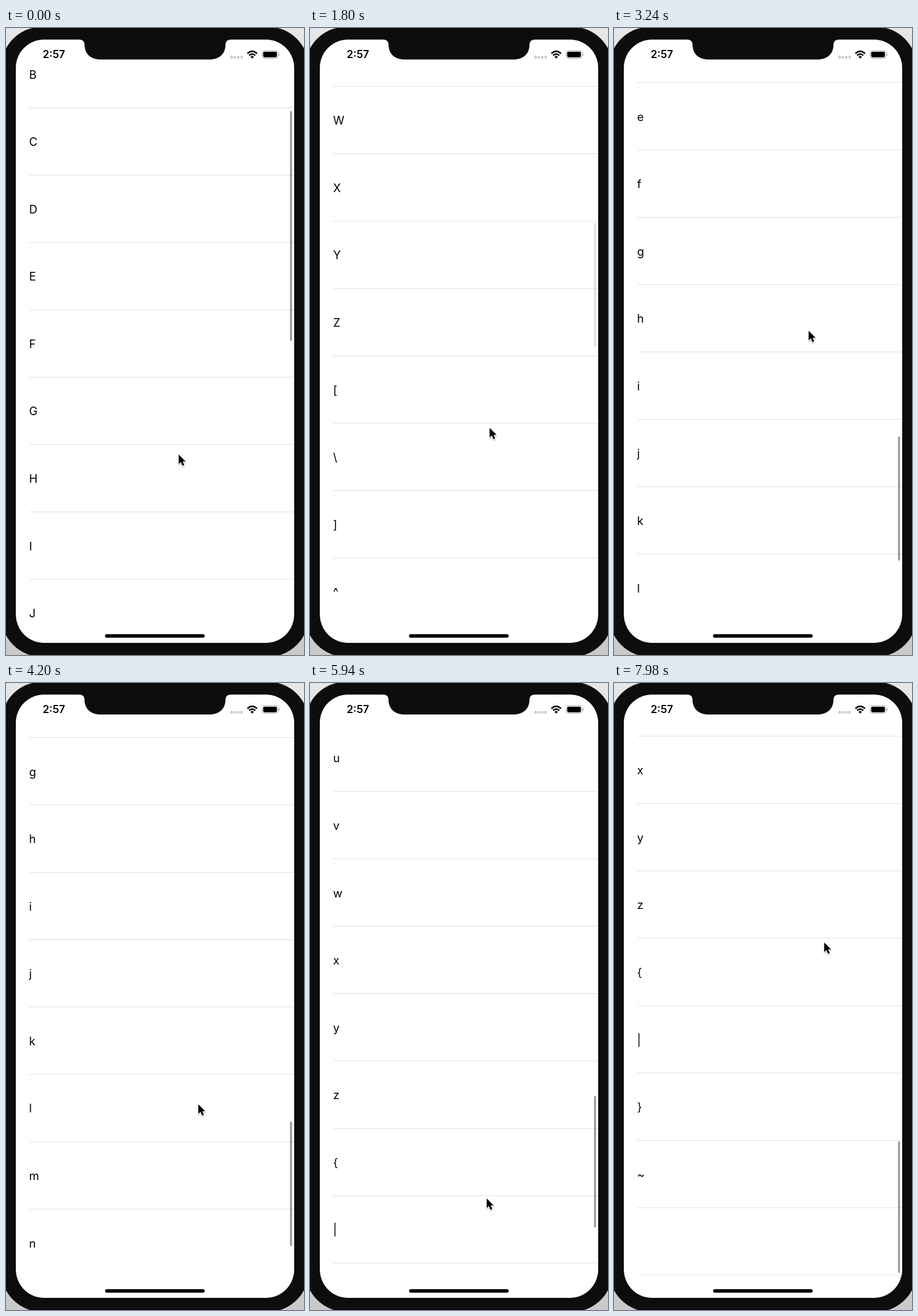
An HTML page that plays this animation: 516x1085 px, repeating every 8 s.

```html
<!DOCTYPE html>
<html lang="en">
<head>
<meta charset="utf-8">
<title>Endless list</title>
<style>
  html, body { margin: 0; width: 100%; height: 100%; overflow: hidden; background: #dcdcde; }
  svg { display: block; width: 100%; height: 100%; font-family: Inter, "Liberation Sans", sans-serif; }
</style>
</head>
<body>
<svg viewBox="0 0 516 1085">
  <defs>
    <linearGradient id="desk" x2="0" y2="1">
      <stop stop-color="#e6e6e8"/><stop offset="1" stop-color="#c9c9ca"/>
    </linearGradient>
    <clipPath id="view"><rect x="17" y="71.2" width="482" height="953.6"/></clipPath>
    <filter id="soft" x="-50%" y="-50%" width="200%" height="200%">
      <feDropShadow dx="0" dy="1.5" stdDeviation="1.2" flood-opacity=".35"/>
    </filter>
  </defs>

  <rect width="516" height="1085" fill="url(#desk)"/>
  <rect x="-8" y="-2" width="532" height="1090" rx="70" fill="#0d0d0d"/>
  <rect x="17" y="20" width="482" height="1044" rx="49" fill="#fff"/>

  <g clip-path="url(#view)"><g id="rows" font-size="19.8"></g></g>
  <rect id="thumb" x="491.7" width="3.6" rx="1.8" fill-opacity=".39"/>

  <path d="M126 19.5H390V20Q380 20 380 29C380 45 369 54.5 352 54.5H164C147 54.5 136 45 136 29Q136 20 126 20Z" fill="#0d0d0d"/>
  <text x="63.5" y="52.3" font-size="18.2" font-weight="600">2:57</text>
  <g fill="#c9c9c9">
    <rect x="388.4" y="48.6" width="4.4" height="4.2" rx="1"/>
    <rect x="394.2" y="48.6" width="4.4" height="4.2" rx="1"/>
    <rect x="400" y="48.6" width="4.4" height="4.2" rx="1"/>
    <rect x="405.8" y="48.6" width="4.4" height="4.2" rx="1"/>
  </g>
  <g fill="none" stroke="#000" stroke-width="2.7">
    <path d="M418 44.2Q426.3 36.4 434.6 44.2"/>
    <path d="M421 47.6Q426.3 42.6 431.6 47.6"/>
  </g>
  <path d="M423.4 49.8Q426.3 47.3 429.2 49.8L426.3 53Z"/>
  <rect x="443.5" y="39.1" width="27.4" height="13.4" rx="4" fill="none" stroke="#a0a0a0"/>
  <rect x="445.3" y="40.9" width="23.8" height="9.8" rx="2.4"/>
  <path d="M472.3 43.6Q474 44 474 45.8T472.3 48Z" fill="#a0a0a0"/>
  <rect x="171.5" y="1049" width="172.5" height="6" rx="3"/>

  <path id="cursor" d="M0 0V16.6L3.8 13.1L6.6 19.6L9.6 18.3L6.9 12H12Z" stroke="#fff" stroke-width="1.3" paint-order="stroke" filter="url(#soft)"/>
</svg>
<script>
const LOOP = 8000, STEP = 60;
const ROW = 116.57, TOP = 71.2, PAGE = 953.4 / ROW;   // PAGE: visible rows
const FIRST = 65, LAST = 127, END = LAST + 1 - PAGE;
const LOAD1 = 1200, LOAD2 = 5940;                      // more rows arrive
const $ = id => document.getElementById(id);
const clamp = (v, a = 0, b = 1) => Math.min(b, Math.max(a, v));

function add(parent, tag, attrs, text = '') {
  const el = document.createElementNS('http://www.w3.org/2000/svg', tag);
  for (const k in attrs) el.setAttribute(k, attrs[k]);
  el.textContent = text;
  return parent.appendChild(el);
}

const rows = [];
for (let c = FIRST; c <= LAST; c++) {
  const y = (c - FIRST) * ROW, g = add($('rows'), 'g', {});
  add(g, 'text', { x: 40, y: y + 66.2 }, c < 127 ? String.fromCharCode(c) : '');
  add(g, 'rect', { x: 40, y: y + ROW - .5, width: 459, height: 1, fill: '#dededf' });
  rows.push(g);
}

// Drag speeds up from rest; coast dies away exponentially.
const drag = (t, t0, t1, a, b) => a + (b - a) * clamp((t - t0) / (t1 - t0)) ** 2;
const decay = (t, t0, tau) => 1 - Math.exp(-(t - t0) / tau);
const coast = (t, t0, t1, tau, a, b) =>
  a + (b - a) * decay(Math.min(t, t1), t0, tau) / decay(t1, t0, tau);

// Character code (with fraction) at the top edge of the list.
function scrollAt(t) {
  if (t < 2480) return coast(t, 0, LOAD1, 420, 66.427, 86.744);
  if (t < 2733) return drag(t, 2480, 2733, 86.744, 90.6);
  if (t < 5040) return coast(t, 2733, 5040, 285, 90.6, 102.869);
  if (t < 5340) return drag(t, 5040, 5340, 102.869, 106.363);
  if (t < 6620) return coast(t, 5340, LOAD2, 350, 106.363, 117);
  if (t < 6960) return drag(t, 6620, 6960, 117, 119.75);
  const peak = .65;
  if (t < 7110) return 119.75 + (END + peak - 119.75) * Math.sin((t - 6960) / 150 * Math.PI / 2);
  const x = (t - 7110) / 70;
  return END + peak * (1 + x) * Math.exp(-x);
}

// Content extent as the scroll indicator estimates it: [start, length] in rows.
function extent(t, top) {
  const low = top + PAGE;
  if (t < LOAD1) return [FIRST, low - FIRST + .44 * (97 - low)];
  if (t < LOAD2) return [76.75, Math.max(36, low - 76.75 + .5)];
  return [94, 34];
}

function thumbAlpha(t) {
  if (t < 2480) return clamp((1855 - t) / 160);
  if (t > 4500 && t < 5040) return clamp((4750 - t) / 160);
  return 1;
}

// time, x, y of the pointer tip
const path = [
  [0, 299, 738], [150, 318, 520], [1150, 318, 520], [1800, 311, 692], [2440, 306, 976],
  [2500, 306, 965], [2740, 337, 524], [3300, 337, 524], [4200, 333, 729], [4940, 318, 966],
  [5060, 318, 960], [5340, 339, 735], [5460, 350, 560], [5580, 350, 560], [5940, 306, 892],
  [6240, 306, 892], [6480, 305, 918], [6640, 305, 918], [6800, 322, 795], [6960, 342, 595],
  [7110, 364, 449], [LOOP, 364, 449]
];
function pointer(t) {
  const i = path.findIndex(p => p[0] > t), a = path[i - 1], b = path[i];
  const u = (t - a[0]) / (b[0] - a[0]);
  return [1, 2].map(k => a[k] + (b[k] - a[k]) * u);
}

function draw(t) {
  const top = scrollAt(t), last = t < 5400 ? 113 : LAST;
  $('rows').setAttribute('transform', `translate(0 ${TOP + (FIRST - top) * ROW})`);
  rows.forEach((g, i) => {
    const c = FIRST + i;
    g.style.display = c <= last && c > top - 1 && c < top + PAGE ? '' : 'none';
  });

  const [start, n] = extent(t, top), y = 74 + 947 * (top - start) / n;
  const bottom = Math.min(1021, y + 947 * PAGE / n);
  $('thumb').setAttribute('y', y);
  $('thumb').setAttribute('height', bottom - y);
  $('thumb').setAttribute('opacity', thumbAlpha(t));
  $('cursor').setAttribute('transform', `translate(${pointer(t).join(' ')})`);
}

const begin = performance.now();
function tick() {
  const t = (performance.now() - begin) % LOOP;
  draw(Math.floor(t / STEP) * STEP);
  requestAnimationFrame(tick);
}
tick();
</script>
</body>
</html>
```
